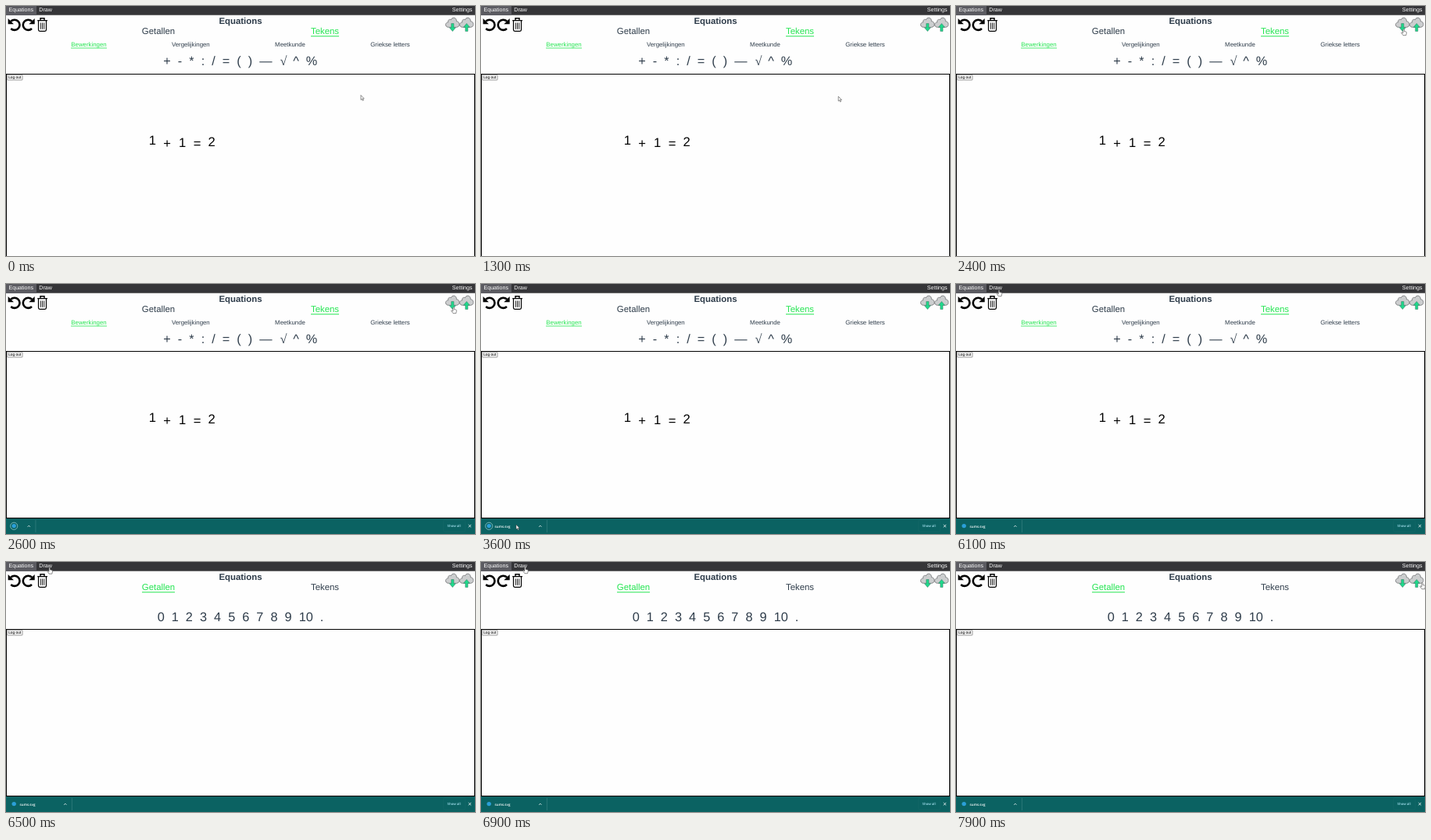
An HTML page for the animation above (8 s loop, 600 by 321 pixels).

```html
<!DOCTYPE html>
<html lang="nl">
<head>
<meta charset="utf-8">
<title>Equations</title>
<style>
  html, body { margin: 0; width: 100%; height: 100%; overflow: hidden; background: #fefefe; }
  svg { display: block; width: 100vw; height: 100vh; }
  text { font-family: "Liberation Sans", Arial, sans-serif; fill: #2e3c4a; white-space: pre; text-rendering: geometricPrecision; }
  .mid { text-anchor: middle; }
  .head text { fill: #fff; font-size: 7.1px; }
  .tab { font-size: 11.4px; }
  .sub { font-size: 7.85px; }
  .sign { font-size: 16.3px; }
  .root { font-family: "Liberation Serif", serif; }
  .sum text { fill: #000; font-size: 16.6px; }
  .on { fill: #25e552; }
  .shelf text { font-family: "Open Sans", sans-serif; font-weight: 600; fill: #fff; font-size: 4.5px; }
</style>
</head>
<body>
<svg viewBox="0 0 600 321" preserveAspectRatio="none">
  <defs>
    <g id="turn">
      <path d="M-5,-4.3A6.6,6.6 0 1 1 -4.9,5" fill="none" stroke="#000" stroke-width="2.6"/>
      <path d="M-8.6,-8V-.7H-1.3Z"/>
    </g>
    <path id="cloud" d="M-5,5.8C-10,5.8 -10,-.4 -5.6,-.6C-6.4,-4.2 -2.8,-5 -2,-3.6C-.8,-8 5.6,-7 5,-1.8C9.6,-2 10,5.8 5,5.8Z" fill="#cccecf" stroke="#606265" stroke-width=".7"/>
    <path id="arrow" d="M-1.6,-4.8H1.6V.4H4L0,5.2L-4,.4H-1.6Z" fill="#1fd98b" stroke="#3c7a66" stroke-width=".55"/>
  </defs>

  <rect width="600" height="321" fill="#fefefe"/>
  <g class="head">
    <rect width="600" height="11.7" fill="#353538"/>
    <rect width="39" height="11.7" fill="#5b5b61"/>
    <text x="3.5" y="6.8">Equations</text>
    <text x="42.3" y="6.8">Draw</text>
    <text x="596.5" y="6.8" text-anchor="end">Settings</text>
  </g>

  <use href="#turn" x="11.2" y="24"/>
  <use href="#turn" transform="translate(28.1 24) scale(-1 1)"/>
  <g fill="none" stroke="#000" stroke-width="1.2">
    <path d="M40.2,18.6H53M44,18V15.8H49V18" stroke-width="1.4"/>
    <path d="M41.5,19V30.6Q41.5,32.3 43.2,32.3H49.8Q51.5,32.3 51.5,30.6V19"/>
    <path d="M44.3,21.5V29.8M46.5,21.5V29.8M48.7,21.5V29.8" stroke-width=".9"/>
  </g>
  <use href="#cloud" x="571.3" y="21.5"/>
  <use href="#arrow" x="571.3" y="27.3"/>
  <use href="#cloud" x="589.3" y="21.5"/>
  <use href="#arrow" transform="translate(589.3 27.6) scale(1 -1)"/>

  <text class="mid tab" x="300" y="22.6" font-weight="bold">Equations</text>
  <text class="mid tab" id="numTab" x="195" y="36">Getallen</text>
  <text class="mid tab" id="signTab" x="408" y="36">Tekens</text>
  <rect id="tabLine" y="38.3" height="1" fill="#25e552"/>

  <g id="signs">
    <text class="mid sub on" x="106" y="52.1">Bewerkingen</text>
    <rect x="83" y="53.6" width="46" height=".8" fill="#25e552"/>
    <text class="mid sub" x="236.3" y="52.1">Vergelijkingen</text>
    <text class="mid sub" x="363.5" y="52.1">Meetkunde</text>
    <text class="mid sub" x="491.5" y="52.1">Griekse letters</text>
  </g>
  <g id="digits"></g>

  <g id="board">
    <rect id="frame" x=".5" y="87.5" width="599" fill="#fefefe" stroke="#000"/>
    <rect x="1.3" y="88.3" width="19.8" height="6.8" rx=".8" fill="#efefef" stroke="#6a6a6a" stroke-width=".6"/>
    <text class="mid" x="11.2" y="93.4" font-size="4.8" style="fill:#000">Log out</text>
    <g id="sum" class="sum"></g>
  </g>

  <g id="shelf" class="shelf">
    <rect y="301" width="600" height="20" fill="#0b6262"/>
    <circle id="ring" cx="10.2" cy="310.8" r="4.6" fill="none" stroke="#8fc9cf" stroke-width=".8"/>
    <circle cx="10.2" cy="310.6" r="2.7" fill="#2b9fd8"/>
    <text id="file" x="17.6" y="312.5">sums.svg</text>
    <g id="item">
      <path d="M-1.6,311.8L0,310.2L1.6,311.8" fill="none" stroke="#fff" stroke-width=".8"/>
      <path d="M8.6,303V319" stroke="#3f8787" stroke-width=".6"/>
    </g>
    <rect x="559.7" y="303" width="27.6" height="15" rx="1.5" fill="none" stroke="#196b6b" stroke-width=".6"/>
    <text x="564.6" y="312.2" style="fill:#a5e2f0;font-size:4.3px">Show all</text>
    <path d="M591.7,309L595.1,312.4M595.1,309L591.7,312.4" stroke="#fff" stroke-width=".8"/>
  </g>

  <g id="cursor" stroke="#444" stroke-width=".6" fill="#fff" stroke-linejoin="round">
    <path id="pointer" d="M0,0V6L1.4,4.8L2.4,7L3.4,6.5L2.4,4.4H4.2Z"/>
    <path id="hand" d="M-.7,.6Q0,-.6 .7,.6V3L3.2,3.6Q4,3.9 3.8,5L3.1,8.2H-.6L-2.9,4.9Q-2.6,3.9 -1.7,4.6L-.7,5.4Z"/>
  </g>
</svg>

<script>
const LOOP = 8000, STEP = 100;
const $ = id => document.getElementById(id);
const clamp = v => Math.max(0, Math.min(1, v));
const ease = v => v * v * (3 - 2 * v);
const show = (el, on) => el.setAttribute("display", on ? "inline" : "none");
const move = (el, x, y) => el.setAttribute("transform", `translate(${x} ${y})`);

function addText(parent, str, x, y, cls) {
  const el = document.createElementNS("http://www.w3.org/2000/svg", "text");
  el.setAttribute("x", x);
  el.setAttribute("y", y);
  el.setAttribute("class", "mid " + cls);
  el.textContent = str;
  parent.append(el);
}

const signX = [206, 222.5, 237.5, 252, 265.5, 281.5, 298, 312.5, 332.3, 355, 371, 391];
[..."+-*:/=()—√^%"].forEach((s, i) =>
  addText($("signs"), s, signX[i], 76.2, s === "√" ? "sign root" : "sign"));
for (let n = 0; n < 10; n++) addText($("digits"), n, 198.2 + 18.1 * n, 76, "sign");
addText($("digits"), "10", 383.8, 76, "sign");
addText($("digits"), ".", 404, 76, "sign");
[["1", 187.4, 178.3], ["+", 206.2, 182], ["1", 225.6, 180.8], ["=", 244.5, 182], ["2", 263, 180]]
  .forEach(([s, x, y]) => addText($("sum"), s, x, y, ""));

// time, x, y of the cursor tip
const path = [
  [0, 454, 114.5], [900, 452, 120], [1200, 452, 120], [2000, 572.6, 29.5], [2600, 572.6, 29.5],
  [3000, 420, 150], [3500, 45, 309], [3900, 45, 309], [4600, 592, 30.5], [4800, 592, 30.5],
  [5600, 55, 7.5], [6200, 55, 7.5], [6800, 56.5, 6.5], [6900, 56.5, 6.5], [7800, 596.5, 26.5]
];

function cursorAt(t) {
  const i = path.findIndex(p => p[0] > t);
  if (i < 0) return path[path.length - 1].slice(1);
  const [t0, x0, y0] = path[i - 1], [t1, x1, y1] = path[i];
  const k = ease((t - t0) / (t1 - t0));
  return [x0 + (x1 - x0) * k, y0 + (y1 - y0) * k];
}

function draw(t) {
  const fresh = t >= 6400;
  const shelfOpen = t >= 2500;
  const grow = ease(clamp((t - 2600) / 200));

  show($("signs"), !fresh);
  show($("digits"), fresh);
  show($("sum"), !fresh);
  $("numTab").classList.toggle("on", fresh);
  $("signTab").classList.toggle("on", !fresh);
  $("tabLine").setAttribute("x", fresh ? 174 : 390);
  $("tabLine").setAttribute("width", fresh ? 42 : 36);

  move($("board"), 0, shelfOpen ? -1 : 0);
  $("frame").setAttribute("height", shelfOpen ? 214 : 240);
  show($("shelf"), shelfOpen);
  show($("ring"), t < 5500);
  show($("file"), grow === 1);
  move($("item"), 29.3 + 46.5 * grow, 0);

  const [x, y] = cursorAt(t);
  const onLink = y < 36 && x > 563 || y < 12 && x < 62;
  move($("cursor"), x, y);
  show($("hand"), onLink);
  show($("pointer"), !onLink);
}

const start = performance.now();
function tick() {
  const t = (performance.now() - start) % LOOP;
  draw(Math.floor(t / STEP) * STEP);
  requestAnimationFrame(tick);
}
tick();
</script>
</body>
</html>
```
